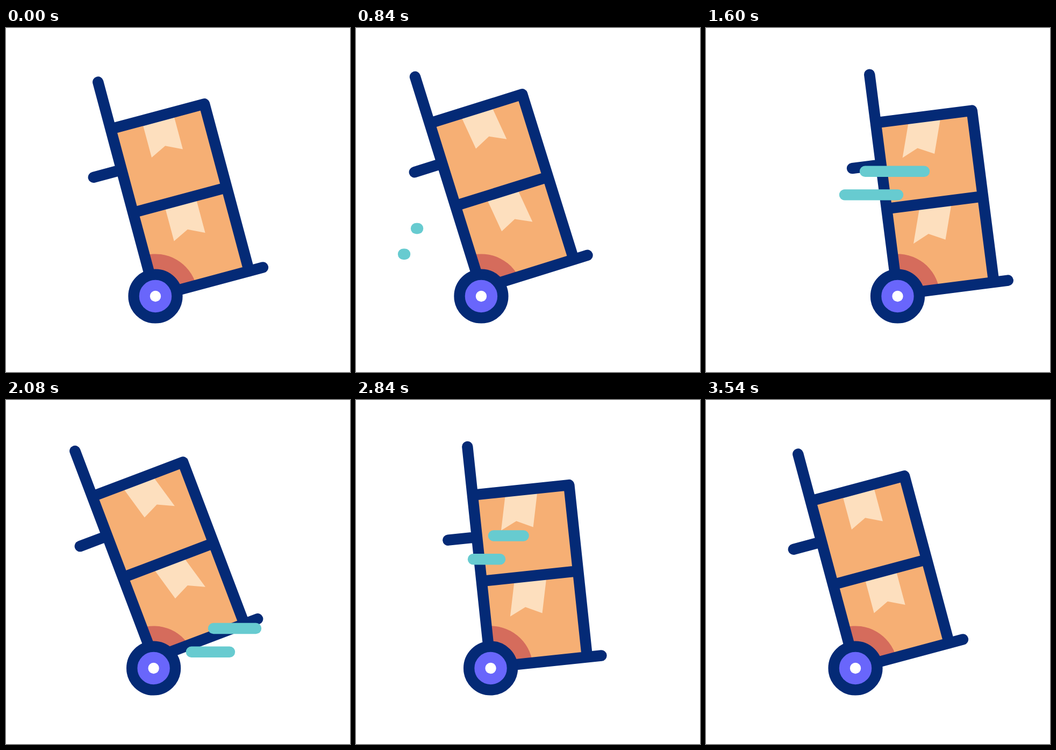
An HTML page for the animation above (3600 ms loop, 640 px wide and 640 px high).

```html
<!DOCTYPE html>
<html lang="en">
<head>
<meta charset="utf-8">
<title>Hand truck</title>
<style>
  html, body { margin: 0; width: 100%; height: 100%; overflow: hidden; background: #fff; }
  svg { display: block; width: 100vw; height: 100vh; }
  .bar { fill: none; stroke: #042a76; stroke-width: 20.4; stroke-linecap: round; stroke-linejoin: round; }
  .box { fill: #f6af74; }
  .tape { fill: #fddfbe; }
  .speed { stroke: #67cbd0; stroke-width: 20.4; stroke-linecap: round; }
</style>
</head>
<body>
<svg viewBox="0 0 640 640">
  <defs>
    <clipPath id="lower"><rect y="-161" width="180.5" height="161"/></clipPath>
  </defs>
  <g id="body">
    <rect class="box" y="-322" width="180.5" height="322"/>
    <path class="tape"/>
    <path class="tape"/>
    <g clip-path="url(#lower)"><circle id="shade" r="78.6" fill="#d56c5c"/></g>
    <path class="bar" d="M0-412.5V0H207M0-322H180.5V0M0-161H180.5M-54-243.5H0"/>
  </g>
  <g id="wheel">
    <circle class="bar" r="40.4" style="fill:#6966fb"/>
    <circle r="10.2" fill="#fff"/>
  </g>
  <g id="speed"></g>
</svg>
<script>
const LOOP = 3600, GROUND = 499;
const HOME = 278, LEFT = 232, RIGHT = 356.5;

const rest = { tilt: 15, lift: 0, swing: 0 };
const back = { tilt: 21, lift: -18.6, swing: 17.8 };
const fore = { tilt: 5.3, lift: -1, swing: -24 };
const calm = { ...fore, swing: -15.5 };

const $ = id => document.getElementById(id);
const clamp = u => Math.min(1, Math.max(0, u));
const smooth = u => u * u * (3 - 2 * u);
const settle = u => smooth(1 - (1 - u) ** 2);
const mix = (a, b, u) => a + (b - a) * u;
const ease = (t, a, b, curve = smooth) => curve(clamp((t - a) / (b - a)));

const mixPose = (p, q, u) => ({
  tilt: mix(p.tilt, q.tilt, u),
  lift: mix(p.lift, q.lift, u),
  swing: mix(p.swing, q.swing, u)
});

// each move: start time, end time, goal, easing
const follow = (t, from, moves, blend) =>
  moves.reduce((v, [a, b, goal, curve]) => blend(v, goal, ease(t, a, b, curve)), from);

const drive = [
  [222, 652, LEFT], [800, 1605, RIGHT], [1720, 2315, LEFT], [2610, 3540, HOME, settle]
];
const sway = [
  [0, 500, back], [600, 1370, fore], [1450, 2130, back], [2260, 2927, calm], [2927, 3540, rest]
];

// a pair of speed lines, drawn from x over len, complete at the given time
const strokes = [];
function gust(full, x, y, len, dx, dy = 43.7, ratio = 0.9) {
  for (const i of [0, 1]) {
    const el = document.createElementNS('http://www.w3.org/2000/svg', 'line');
    el.setAttribute('class', 'speed');
    el.setAttribute('y1', y + i * dy);
    el.setAttribute('y2', y + i * dy);
    $('speed').append(el);
    const tail = x + i * dx;
    strokes.push({ el, full, tail, head: tail + len * (i ? ratio : 1) });
  }
}
gust(480, 328, 103, -110, 77, 45, 1.136);
gust(1110, 112, 373, 103, -24, 47.7, 1);
gust(1600, 296, 266.7, 110, -38);
gust(2186, 465, 425, -110, -49);
gust(2990, 256, 252.5, 110, -38);

const tapes = document.querySelectorAll('.tape');

function draw(t) {
  const x = follow(t, HOME, drive, mix);
  const { tilt, lift, swing } = follow(t, rest, sway, mixPose);
  const rad = tilt * Math.PI / 180;

  $('wheel').setAttribute('transform', `translate(${x} ${GROUND})`);
  $('body').setAttribute('transform', `translate(${x} ${GROUND + lift}) rotate(${-tilt})`);
  // keeps the shade centred on the wheel inside the tilted body
  $('shade').setAttribute('cx', lift * Math.sin(rad));
  $('shade').setAttribute('cy', -lift * Math.cos(rad));

  tapes.forEach((tape, i) => {
    const y = -313 + i * 161;
    tape.setAttribute('d',
      `M60 ${y}h60l${swing} 62l-30-14.5l-30 14.5Z`);
  });

  for (const { el, full, tail, head } of strokes) {
    el.style.display = Math.abs(t - full) < 300 ? '' : 'none';
    el.setAttribute('x1', mix(tail, head, ease(t, full, full + 300)));
    el.setAttribute('x2', mix(tail, head, ease(t, full - 300, full)));
  }
}

const begin = performance.now();
function tick() {
  draw((performance.now() - begin) % LOOP);
  requestAnimationFrame(tick);
}
tick();
</script>
</body>
</html>
```
